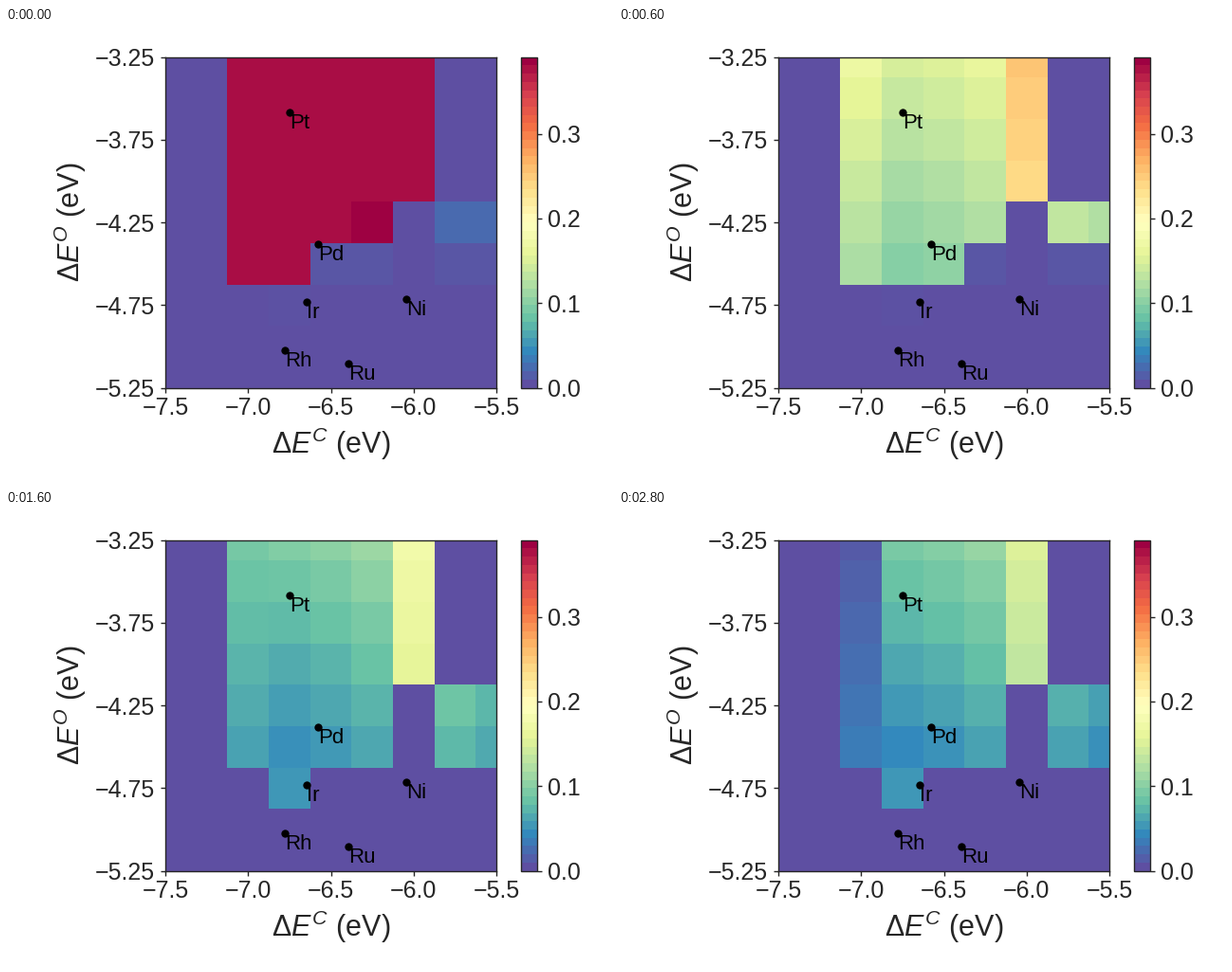
These frames come from a looping animation (640 px wide and 480 px high, 3 s). A matplotlib script:

```python
import numpy as np
import matplotlib.pyplot as plt
from matplotlib.animation import FuncAnimation
from matplotlib.cm import ScalarMappable
from matplotlib.colors import Normalize

W, H, DPI = 640, 480, 100
FRAMES, STEP_MS = 15, 200
TOP = 0.3908
INK = "#262626"

plt.rcParams.update({
    "font.family": "Liberation Sans",
    "mathtext.fontset": "custom",
    "mathtext.rm": "Liberation Sans",
    "mathtext.it": "Liberation Sans:italic",
    "axes.edgecolor": INK,
    "axes.linewidth": 1.0,
    "xtick.color": INK,
    "ytick.color": INK,
    "xtick.major.width": 1.0,
    "ytick.major.width": 1.0,
    "xtick.labelsize": 18,
    "ytick.labelsize": 18,
    "ytick.major.pad": 4.2,
})

METALS = {
    "Pt": (-6.748, -3.585),
    "Pd": (-6.577, -4.380),
    "Ir": (-6.645, -4.730),
    "Ni": (-6.044, -4.712),
    "Rh": (-6.777, -5.021),
    "Ru": (-6.393, -5.104),
}

ROW, COL = np.mgrid[:7, :7]

# Step at which each cell lights up; cells left at infinity stay empty.
start = np.full((7, 7), np.inf)
start[:6, :4] = start[:4, 4] = 0
start[5, 2] = start[4, 5:] = 1
start[5, [3, 5, 6]] = 5
start[6, 1] = 6

# Weak level of a cell before it lights up.
faint = np.where(np.isfinite(start), 1.5, 0)
faint[4, 5:] = 5
faint[6, 1] = 0.5


def decay(t, top, floor, rate):
    return floor + (top - floor) * np.exp(-rate * t)


def values(t):
    """Cell values at step t, worked out in percent of the scale."""
    spread = min(t / 2, 1)
    shift = np.select([COL == 0, COL == 1, COL == 3], [4, -1.5, 2.5], 0)
    v = decay(t, 98, 24.5, 0.55) + spread * (shift - 2.5 * ROW)
    v[4, 3] += decay(t, 2, 0, 3)

    # The leftmost column fades out over the second half.
    fade = np.clip((14 - t) / 8, 0, 1)
    end = 2 + 1.2 * ROW[:, 0]
    v[:, 0] = end + (v[:, 0] - end) * fade

    # Slower decay to the right.
    v[:, 4] = decay(t, 98, 36.5, 0.25) - 1.5 * spread * ROW[:, 4]
    side = decay(t, 54, 16, 0.25) - 3 * (COL - 5) - 2.5 * (ROW - 4)
    v[:, 5:] = side[:, 5:]
    v[6, 1] = decay(max(t - 6, 0), 33, 12.5, 3)

    return np.where(t >= start, v, faint) / 100 * TOP


def add_axes(x, y, w, h):
    return fig.add_axes([x / W, 1 - (y + h) / H, w / W, h / H])


fig = plt.figure(figsize=(W / DPI, H / DPI), dpi=DPI, facecolor="white")
cmap = plt.get_cmap("Spectral_r")
norm = Normalize(0, TOP)

ax = add_axes(168, 30.6, 349, 349)
ax.set_facecolor(cmap(0.0))
x_edges = -7.125 + 0.25 * np.arange(8)
y_edges = -3.125 - 0.25 * np.arange(8)
mesh = ax.pcolormesh(x_edges, y_edges, values(0), cmap=cmap, norm=norm)
ax.set_xlim(-7.5, -5.5)
ax.set_ylim(-5.25, -3.25)
ax.set_xticks(np.arange(-7.5, -5.4, 0.5))
ax.set_yticks(np.arange(-5.25, -3.2, 0.5))

for name, (x, y) in METALS.items():
    ax.plot(x, y, "o", color="black", ms=6, mew=0)
    ax.text(x, y - 0.007, name, color="black", size=16, va="top")

label = dict(size=22, color=INK, ha="center", va="baseline",
             rotation_mode="anchor")
fig.text(343 / W, 1 - 449 / H, r"$\Delta E^{C}$ (eV)", **label)
fig.text(78 / W, 1 - 205 / H, r"$\Delta E^{O}$ (eV)", rotation=90, **label)

bands = ScalarMappable(norm, plt.get_cmap("Spectral_r", 40))
fig.colorbar(bands, cax=add_axes(543.3, 30.6, 16.9, 349),
             ticks=[0, 0.1, 0.2, 0.3])


def draw(i):
    mesh.set_array(values(i))
    return [mesh]


anim = FuncAnimation(fig, draw, frames=FRAMES, interval=STEP_MS,
                     repeat=True, repeat_delay=0)
plt.show()
```
